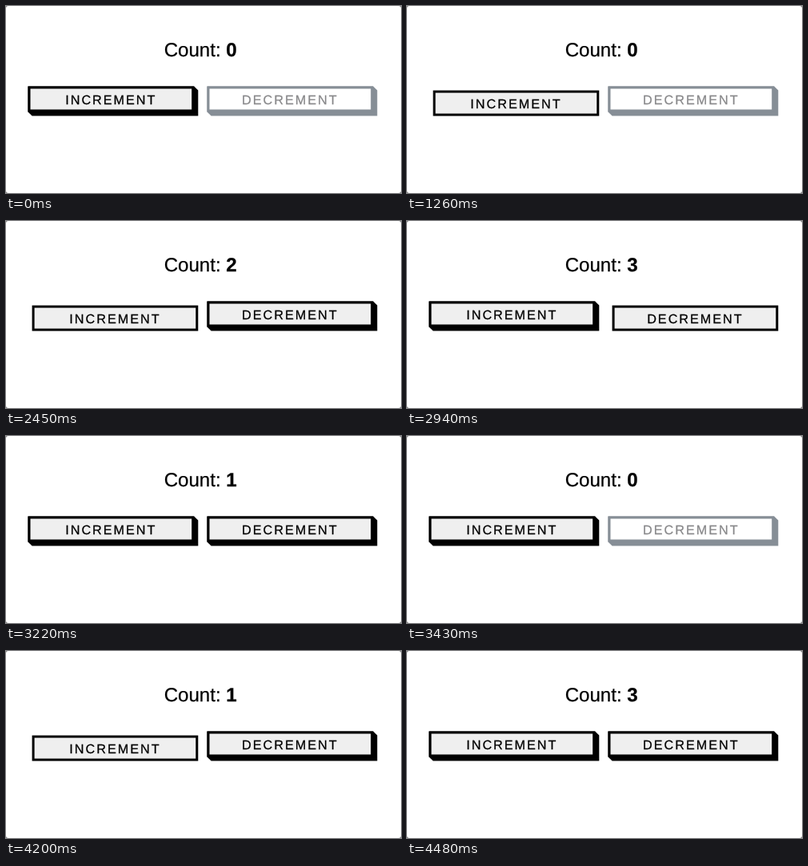
An HTML page that plays this animation: 494x234 px, repeating every 4970 ms.

```html
<!DOCTYPE html>
<html lang="en">
<head>
<meta charset="utf-8">
<title>Counter</title>
<style>
  html, body { margin: 0; width: 100%; height: 100%; overflow: hidden; background: #777; }
  svg { display: block; width: 494px; height: 234px; }
  text {
    font-family: "Liberation Sans", Arial, sans-serif;
    text-anchor: middle;
    text-rendering: geometricPrecision;
    stroke: currentColor;
    fill: currentColor;
    stroke-width: 0.25px;
  }
  .count { font-size: 24.1px; white-space: pre; }
  .label { font-size: 16.2px; letter-spacing: 2px; }
</style>
</head>
<body>
<svg viewBox="0 0 494 234">
  <rect width="494" height="234" rx="3" fill="#fff"/>
  <text class="count" x="243.2" y="63">Count: <tspan id="value" font-weight="bold">0</tspan></text>
  <g id="buttons"></g>
</svg>
<script>
const LOOP = 4970;
const W = 207.7, H = 32, DEPTH = 5.1, BORDER = 3;

// Each click: button, press time, release time
const clicks = [
  ["inc", 1260, 1400], ["inc", 2240, 2380], ["inc", 2450, 2520],
  ["dec", 2940, 3080], ["dec", 3150, 3220], ["dec", 3360, 3430],
  ["inc", 4060, 4130], ["inc", 4200, 4340], ["inc", 4410, 4480]
];

function add(parent, tag, attrs) {
  const el = document.createElementNS("http://www.w3.org/2000/svg", tag);
  for (const key in attrs) el.setAttribute(key, attrs[key]);
  return parent.appendChild(el);
}

function makeButton(x, y, label) {
  const root = add(document.getElementById("buttons"), "g", { transform: `translate(${x} ${y})` });
  const side = add(root, "path", {
    d: `M0 0H${W}l${DEPTH} ${DEPTH}v${H}h${-W}l${-DEPTH} ${-DEPTH}z`
  });
  const top = add(root, "g", {});
  const face = add(top, "rect", {
    x: BORDER / 2, y: BORDER / 2, width: W - BORDER, height: H - BORDER, "stroke-width": BORDER
  });
  const text = add(top, "text", { class: "label", x: W / 2, y: 22.2 });
  text.textContent = label;

  return (pressed, enabled) => {
    const line = enabled ? "#000" : "#868e96";
    const shift = pressed ? DEPTH : 0;
    top.setAttribute("transform", `translate(${shift} ${shift})`);
    side.setAttribute("visibility", pressed ? "hidden" : "visible");
    side.setAttribute("fill", line);
    face.setAttribute("stroke", line);
    face.setAttribute("fill", enabled ? "#efefef" : "#fff");
    text.setAttribute("color", enabled ? "#000" : "#88888a");
  };
}

const value = document.getElementById("value");
const setInc = makeButton(27.5, 100.5, "INCREMENT");
const setDec = makeButton(251.5, 100.5, "DECREMENT");

function draw(time) {
  let count = 0, held = "";
  for (const [name, down, up] of clicks) {
    if (time >= up) count += name === "inc" ? 1 : -1;
    else if (time >= down) held = name;
  }
  value.textContent = count;
  setInc(held === "inc", true);
  setDec(held === "dec", count > 0);
}

const start = performance.now();
function tick() {
  draw((performance.now() - start) % LOOP);
  requestAnimationFrame(tick);
}
tick();
</script>
</body>
</html>
```
